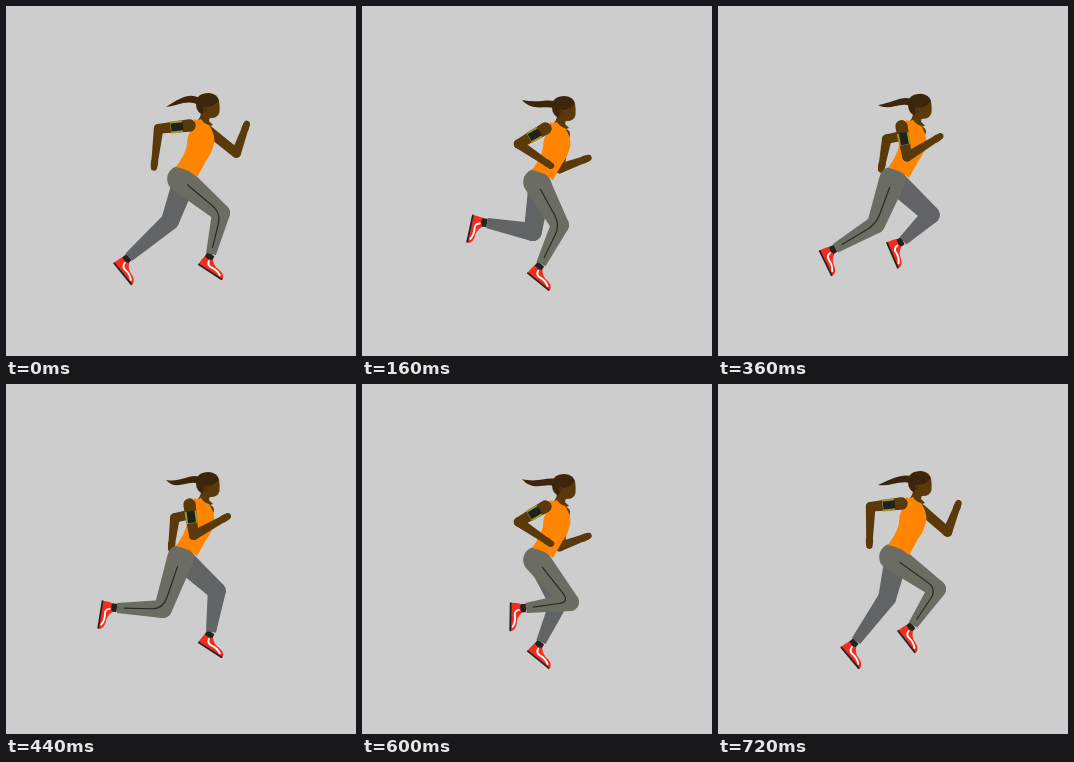
An HTML page with a canvas for the animation above (0.76 s loop, 350 by 350 pixels).

```html
<!DOCTYPE html>
<html lang="en">
<head>
<meta charset="utf-8">
<title>Runner</title>
<style>
  html, body { margin: 0; width: 100%; height: 100%; overflow: hidden; background: #cdcdcd; }
  canvas { display: block; width: 350px; height: 350px; }
</style>
</head>
<body>
<canvas id="stage" width="350" height="350"></canvas>
<script>
const ctx = document.getElementById('stage').getContext('2d');
const LOOP = 760, STEP = 40, FAR_LEG_SHIFT = 320;
const C = {
  bg: '#cdcdcd', skin: '#5a390b', hair: '#3c250a', shirt: '#ff8500',
  near: '#6c6d62', far: '#626365', line: '#292a25', dark: '#24231f',
  shoe: '#f42c1e', white: '#fff', band: '#9b952f', phone: '#20211b'
};

// time, knee x, knee y, ankle x, ankle y, foot angle
const LEG = [
  [0, 215, 207, 205, 248, 33],
  [80, 205, 216, 201, 260, 17],
  [160, 198, 219, 179, 258, 39],
  [280, 166, 214, 138, 257, 50],
  [320, 160, 215, 123, 251, 51],
  [400, 157, 222, 114, 233, 80],
  [440, 157, 225, 111, 224, 99],
  [480, 168, 226, 125, 217, 102],
  [600, 208, 218, 164, 224, 91],
  [720, 219, 205, 195, 241, 52]
];

// time from the back swing, then upper and lower angles of the near and far arm
const ARM = [
  [0, 174, 97, 39, -70],
  [40, 174, 92, 41, -69],
  [80, 172, 81, 55, -53],
  [160, 150, 34, 99, -20],
  [280, 86, -23, 166, 87],
  [320, 82, -29, 167, 97],
  [380, 79, -32, 168, 101]
];
const mirrored = ARM.slice(1, -1).reverse().map(([t, ...a]) => [LOOP - t, ...a]);
const ARMS = ARM.concat(mirrored);

// time, body drop, tail tip y, tail inner y, tail outer y
const BODY = [
  [0, 0, 101, 87, 91],
  [80, 1, 95, 89, 98],
  [160, 3, 91, 90, 94],
  [280, 1, 100, 90, 93],
  [440, 1, 95, 88, 98],
  [600, 3, 92, 90, 96],
  [720, 0, 101, 90, 94]
];

// Smooth periodic curve through a table of keys
function sample(keys, time) {
  const n = keys.length;
  const t = time % LOOP;
  const key = (i, c) => {
    const k = keys[(i + n) % n];
    return c ? k[c] : k[0] + LOOP * Math.floor(i / n);
  };
  let i = n - 1;
  while (keys[i][0] > t) i--;
  const span = key(i + 1, 0) - key(i, 0);
  const u = (t - key(i, 0)) / span;
  const slope = (j, c) => (key(j + 1, c) - key(j - 1, c)) / (key(j + 1, 0) - key(j - 1, 0));
  return keys[0].slice(1).map((_, k) => {
    const c = k + 1, a = key(i, c), b = key(i + 1, c);
    const v = 1 - u;
    return a * v * v * (1 + 2 * u) + b * u * u * (3 - 2 * u)
      + span * u * v * (v * slope(i, c) - u * slope(i + 1, c));
  });
}

const rad = deg => deg * Math.PI / 180;
const polar = ([x, y], deg, r) => [x + r * Math.cos(rad(deg)), y + r * Math.sin(rad(deg))];
const mix = (a, b, u) => [a[0] + (b[0] - a[0]) * u, a[1] + (b[1] - a[1]) * u];

function fill(d, color) {
  ctx.fillStyle = color;
  ctx.fill(new Path2D(d));
}

function stroke(d, color, width) {
  ctx.strokeStyle = color;
  ctx.lineWidth = width;
  ctx.stroke(new Path2D(d));
}

function at([x, y], deg, draw) {
  ctx.save();
  ctx.translate(x, y);
  ctx.rotate(rad(deg));
  draw();
  ctx.restore();
}

// Tapered segment with a round start and an optional round end
function taper(a, b, ra, rb, color, round = true) {
  const deg = Math.atan2(b[1] - a[1], b[0] - a[0]) * 180 / Math.PI;
  const len = Math.hypot(b[0] - a[0], b[1] - a[1]);
  const lean = Math.asin(Math.max(-1, Math.min(1, (ra - rb) / len)));
  const turn = Math.PI / 2 - lean;
  at(a, deg, () => {
    ctx.fillStyle = color;
    ctx.beginPath();
    ctx.arc(0, 0, ra, turn, -turn);
    if (round) {
      ctx.arc(len, 0, rb, -turn, turn);
    } else {
      ctx.lineTo(len, -rb);
      ctx.lineTo(len, rb);
    }
    ctx.fill();
  });
}

function drawShoe(ankle, deg) {
  at(ankle, deg, () => {
    fill('M-4 0H4L5 7H-4Z', C.dark);
    fill('M-5 15Q-5 9 -4 5Q0 7 5 4Q9 9 16 9Q23 10 23.5 15Z', C.shoe);
    stroke('M-4.5 15.4H22.5', C.dark, 1.8);
    stroke('M2 7Q3 12 8 11Q14 10 19 13', C.white, 1.9);
  });
}

function drawLeg(time, drop, isFar) {
  const [kx, ky, ax, ay, foot] = sample(LEG, time);
  const hip = isFar ? [178, 176 + drop] : [174.5, 173 + drop];
  const knee = [kx + (isFar ? (187 - kx) * 0.15 : 0), ky];
  const ankle = [ax, ay];
  const color = isFar ? C.far : C.near;
  drawShoe(ankle, foot);
  taper(hip, knee, isFar ? 11.5 : 13.3, 9, color);
  taper(knee, ankle, 9, 5, color, false);
  if (isFar) return;
  const pts = [mix(hip, knee, 0.17), mix(hip, knee, 0.78), knee,
    mix(knee, ankle, 0.25), mix(knee, ankle, 0.84)];
  stroke(`M${pts[0]}L${pts[1]}Q${pts[2]} ${pts[3]}L${pts[4]}`, C.line, 1.2);
}

function drawArm(shoulder, upper, lower, lens, isFar) {
  const elbow = polar(shoulder, upper, lens[0]);
  const wrist = polar(elbow, lower, lens[1]);
  taper(shoulder, elbow, isFar ? 5 : 6.2, 4.8, C.skin);
  taper(elbow, wrist, 4.8, 3.1, C.skin);
  taper(polar(wrist, lower, -4), polar(wrist, lower, 1), 3.7, 3.2, C.skin);
  if (isFar) return;
  at(polar(shoulder, upper, 13), upper, () => {
    fill('M-6 -6H6V6H-6Z', C.band);
    fill('M-6.5 -4H5.5V4H-6.5Z', C.phone);
  });
}

function drawTorso() {
  fill('M195 106L204 110L203 115L207 119L198 122L189 116Q195 113 195 106Z', C.skin);
  fill('M188 113Q191 115 195 113Q198 118 203 119Q208 126 208.5 135Q207 146 200 155'
    + 'L191 171Q182 163 170 161Q179 149 181 139Q181 131 184 126Q189 120 188 113Z', C.shirt);
}

function drawHead(tip, inner, outer) {
  fill(`M193 92C184 ${inner} 175 ${outer} 160 ${tip}`
    + `C171 ${outer + 9} 182 ${inner + 6} 192 99Z`, C.hair);
  fill('M190 98Q190 87 203 87Q211 88 213 94L210 101L197 109Q190 106 190 98Z', C.hair);
  fill('M213 94Q214 100 213.5 106Q212 112 205 112Q199 113 196 108'
    + 'Q199 106 197 102Q198 99 201 101Q208 101 213 94Z', C.skin);
  stroke('M198.2 101.5Q201 102 199.5 106', C.hair, 0.8);
}

function draw(time) {
  const [drop, tip, inner, outer] = sample(BODY, time);
  const [nearUp, nearLow, farUp, farLow] = sample(ARMS, time);
  ctx.fillStyle = C.bg;
  ctx.fillRect(0, 0, 350, 350);
  drawArm([203, 125 + drop], farUp, farLow, [35, 30], true);
  drawLeg(time + FAR_LEG_SHIFT, drop, true);
  drawLeg(time, drop, false);
  ctx.save();
  ctx.translate(0, drop);
  drawTorso();
  drawHead(tip, inner, outer);
  ctx.restore();
  drawArm([183.5, 119.5 + drop], nearUp, nearLow, [31, 38], false);
}

ctx.lineCap = 'round';
ctx.lineJoin = 'round';
const start = performance.now();
function tick() {
  const elapsed = performance.now() - start;
  draw(Math.floor(elapsed / STEP) * STEP % LOOP);
  requestAnimationFrame(tick);
}
tick();
</script>
</body>
</html>
```
